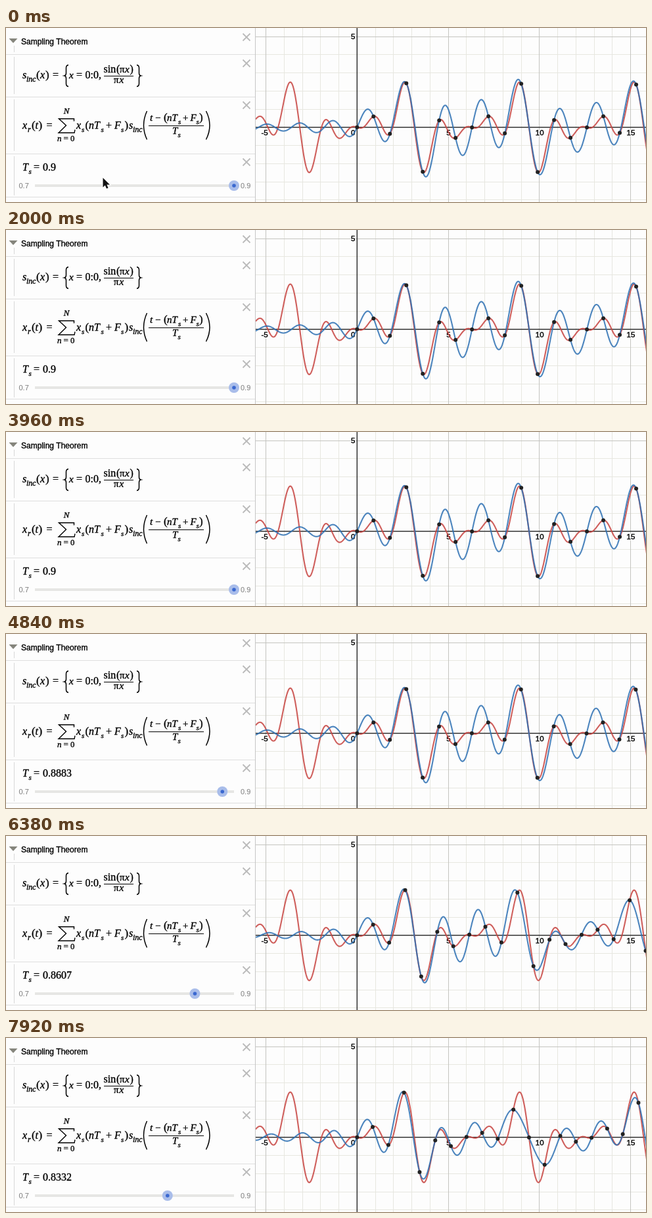
Write an HTML page with a canvas that moves like this. It is 974 by 266 pixels and loops after 8 s.

```html
<!DOCTYPE html>
<html lang="en">
<head>
<meta charset="utf-8">
<title>Sampling Theorem</title>
<style>
  html, body { margin: 0; width: 100%; height: 100%; overflow: hidden; background: #fdfdfd; }
  canvas { display: block; }
</style>
</head>
<body>
<canvas id="stage" width="974" height="266"></canvas>
<script>
const ctx = document.getElementById("stage").getContext("2d");
const W = 974, H = 266, LOOP = 8000;
const PANEL = 380, X0 = 534.3, Y0 = 151.8, UNIT = 27.76, TERMS = 50;
const SERIF = '"Liberation Serif", serif', SANS = '"Liberation Sans", sans-serif';
const RED = "#c74440", BLUE = "#2d70b3", INK = "#000", PAPER = "#fdfdfd";

// Slider value by step, and the slower redraw of the plot by time
const STEP_START = 4120, STEP_MS = 216;
const sliderKeys = [[0, 0.9], [3, 0.8883], [7, 0.8724], [13, 0.849], [17, 0.8332]];
const plotKeys = [[4700, 0.9], [5780, 0.8897], [7040, 0.8673], [7920, 0.8569], [8000, 0.856]];
const CURSOR_UNTIL = 400;

function lerpKeys(keys, x) {
  if (x <= keys[0][0]) return keys[0][1];
  for (let i = 1; i < keys.length; i++) {
    const [xa, a] = keys[i - 1], [xb, b] = keys[i];
    if (x <= xb) return a + (b - a) * (x - xa) / (xb - xa);
  }
  return keys[keys.length - 1][1];
}

const signal = t =>
  (2 / 3) * (Math.sin(t) - Math.sin(2 * t) + 1.5 * Math.sin(3 * t) - Math.sin(4 * t));

// Truncated sinc series; sin(pi(u - n)) = (-1)^n sin(pi u)
function reconstruction(Ts) {
  const samples = Array.from({ length: TERMS + 1 }, (_, n) => signal(n * Ts));
  return t => {
    const u = t / Ts, near = Math.round(u);
    if (near >= 0 && near <= TERMS && Math.abs(u - near) < 1e-6) return samples[near];
    let sum = 0;
    for (let n = 0; n <= TERMS; n++) sum += (n % 2 ? -1 : 1) * samples[n] / (u - n);
    return sum * Math.sin(Math.PI * u) / Math.PI;
  };
}

const px = t => X0 + t * UNIT;
const py = v => Y0 - v * UNIT;

function line(x1, y1, x2, y2, color, width = 1) {
  ctx.strokeStyle = color;
  ctx.lineWidth = width;
  ctx.beginPath();
  ctx.moveTo(x1, y1);
  ctx.lineTo(x2, y2);
  ctx.stroke();
}

function disc(x, y, r, color) {
  ctx.fillStyle = color;
  ctx.beginPath();
  ctx.arc(x, y, r, 0, 2 * Math.PI);
  ctx.fill();
}

// A hairline outline gives the text its slightly heavy weight
function put(text, x, y, font, color = INK, align = "left", weight = 0.35) {
  ctx.font = font;
  ctx.fillStyle = ctx.strokeStyle = color;
  ctx.textAlign = align;
  ctx.lineWidth = weight;
  ctx.fillText(text, x, y);
  ctx.strokeText(text, x, y);
}

const it = (text, x, y, size = 16, align) => put(text, x, y, `italic ${size}px ${SERIF}`, INK, align);
const up = (text, x, y, size = 16, align) => put(text, x, y, `${size}px ${SERIF}`, INK, align);

function strokePath(d, width) {
  ctx.strokeStyle = INK;
  ctx.lineWidth = width;
  ctx.stroke(new Path2D(d));
}

function drawCurve(f, color) {
  ctx.strokeStyle = color;
  ctx.globalAlpha = 0.85;
  ctx.lineWidth = 2.1;
  ctx.lineJoin = "round";
  ctx.beginPath();
  for (let x = PANEL; x <= W + 1; x += 0.5) ctx.lineTo(x, py(f((x - X0) / UNIT)));
  ctx.stroke();
  ctx.globalAlpha = 1;
}

function axisLabel(text, x, y, align) {
  ctx.font = `11.5px ${SANS}`;
  ctx.textAlign = align;
  ctx.strokeStyle = PAPER;
  ctx.lineWidth = 3;
  ctx.strokeText(text, x, y);
  put(text, x, y, ctx.font, INK, align, 0.4);
}

function drawGrid() {
  const snap = v => Math.floor(v) + 0.5;
  for (const major of [false, true]) {
    const color = major ? "#c4c4c0" : "#e7e7e0";
    for (let i = -5; i <= 15; i++)
      if ((i % 5 === 0) === major) line(snap(px(i)), 0, snap(px(i)), H, color);
    for (let i = -4; i <= 5; i++)
      if ((i % 5 === 0) === major) line(PANEL, snap(py(i)), W, snap(py(i)), color);
  }
  line(X0, 0, X0, H, "#333", 1.5);
  line(PANEL, Y0, W, Y0, "#333", 1.5);
}

function drawPlot(Ts) {
  ctx.save();
  ctx.beginPath();
  ctx.rect(PANEL, 0, W - PANEL, H);
  ctx.clip();
  drawGrid();
  axisLabel("-5", 393.5, 164, "center");
  axisLabel("0", 531.5, 164, "right");
  for (const n of [5, 10, 15]) axisLabel(String(n), px(n) + 0.3, 164, "center");
  axisLabel("5", 531.5, 17, "right");
  drawCurve(signal, RED);
  drawCurve(reconstruction(Ts), BLUE);
  for (let n = 0; px(n * Ts) < W + 4; n++) disc(px(n * Ts), py(signal(n * Ts)), 3, "#222");
  ctx.restore();
}

function drawSincRow() {
  it("s", 25, 77);
  it("inc", 31, 82, 12);
  up("(", 46, 77, 17);
  it("x", 52, 77);
  up(")", 60, 77, 17);
  up("=", 71, 77);
  strokePath("M95 56.5 Q91.5 57 91.5 61 V69 Q91.5 72.5 89 73 Q91.5 73.5 91.5 77 V85 Q91.5 89 95 89.5", 1.5);
  it("x", 96, 77, 15);
  up("=", 107, 77);
  up("0:0,", 120.5, 77);
  up("sin", 148.5, 68);
  up("(", 168, 68);
  up("π", 173, 68, 15);
  it("x", 181, 68, 15);
  up(")", 188.5, 68);
  line(149, 73.5, 194, 73.5, INK);
  up("π", 164, 84, 15);
  it("x", 172.5, 84, 15);
  strokePath("M199 56.5 Q202.5 57 202.5 61 V69 Q202.5 72.5 205 73 Q202.5 73.5 202.5 77 V85 Q202.5 89 199 89.5", 1.5);
}

function drawSumRow() {
  it("x", 25, 154);
  it("r", 33, 159, 12);
  up("(", 39, 154, 17);
  it("t", 44.5, 154);
  up(")", 49.5, 154, 17);
  up("=", 61.5, 154);
  it("N", 92, 131, 13, "center");
  strokePath("M103.5 142.5 V138.7 H80.5 L91.5 149 L80 160.3 H104 L105 155.5", 1.4);
  it("n", 78, 173, 13);
  up("= 0", 87.5, 173, 13);
  it("x", 107, 154);
  it("s", 115, 159, 11);
  up("(", 120.5, 154, 17);
  it("nT", 126, 154);
  it("s", 144.5, 159, 11);
  up("+", 152, 154);
  it("F", 165, 154);
  it("s", 175, 159, 11);
  up(")", 180.5, 154, 17);
  it("s", 187, 154);
  it("inc", 193, 159, 12);
  strokePath("M214.5 127 Q204.5 149 214.5 170.5", 1.5);
  it("t", 219, 142, 15);
  up("−", 227, 142, 15);
  up("(", 240, 142, 17);
  it("nT", 245, 142, 15);
  it("s", 262, 147, 11);
  up("+", 269, 142, 15);
  it("F", 280.5, 142, 15);
  it("s", 289.5, 147, 11);
  up(")", 294, 142, 17);
  line(217, 149.5, 301, 149.5, INK);
  it("T", 253, 162, 15);
  it("s", 261.5, 167, 11);
  strokePath("M304.5 127 Q315.5 149 304.5 170.5", 1.5);
}

function drawSlider(value) {
  it("T", 25, 218);
  it("s", 34.5, 223, 11);
  up("=", 42, 218);
  up(String(Number(value.toFixed(4))), 56, 218);
  put("0.7", 19.5, 245, `11px ${SANS}`, "#858585", "left", 0.1);
  put("0.9", 357, 245, `11px ${SANS}`, "#858585", "left", 0.1);
  line(44, 241, 347, 241, "#e6e6e4", 4);
  const x = 44 + 303 * (value - 0.7) / 0.2;
  disc(x, 241, 8, "#a9bdea");
  disc(x, 241, 2.8, "#3a68d0");
}

function drawPanel(value) {
  ctx.fillStyle = PAPER;
  ctx.fillRect(0, 0, PANEL, H);
  for (const y of [40.5, 105.5, 192.5, 258.5]) line(0, y, PANEL, y, "#dedede");
  for (const [a, b] of [[27, 37], [44, 101], [109, 188], [196, 256]])
    line(12.5, a, 12.5, b, "#d8d8d8");
  line(379.5, 0, 379.5, H, "#c6c6c6");
  ctx.fillStyle = "#85857c";
  ctx.fill(new Path2D("M4.5 16 H17.5 L11 23 Z"));
  put("Sampling Theorem", 23, 25, `12px ${SANS}`);
  for (const y of [14, 54, 118, 205]) {
    line(360.5, y - 5.5, 371.5, y + 5.5, "#bababa", 1.8);
    line(360.5, y + 5.5, 371.5, y - 5.5, "#bababa", 1.8);
  }
  drawSincRow();
  drawSumRow();
  drawSlider(value);
}

function drawCursor() {
  const arrow = new Path2D("M147.5 229 V243.5 L150.8 240.5 L153 245.6 L155.6 244.5 L153.4 239.5 H158 Z");
  ctx.strokeStyle = "#fff";
  ctx.lineWidth = 2;
  ctx.stroke(arrow);
  ctx.fillStyle = "#111";
  ctx.fill(arrow);
}

function draw(t) {
  const step = Math.max(0, Math.floor((t - STEP_START) / STEP_MS));
  ctx.fillStyle = PAPER;
  ctx.fillRect(0, 0, W, H);
  drawPlot(lerpKeys(plotKeys, t));
  drawPanel(lerpKeys(sliderKeys, step));
  if (t < CURSOR_UNTIL) drawCursor();
}

const start = performance.now();
function tick() {
  draw((performance.now() - start) % LOOP);
  requestAnimationFrame(tick);
}
tick();
</script>
</body>
</html>
```
